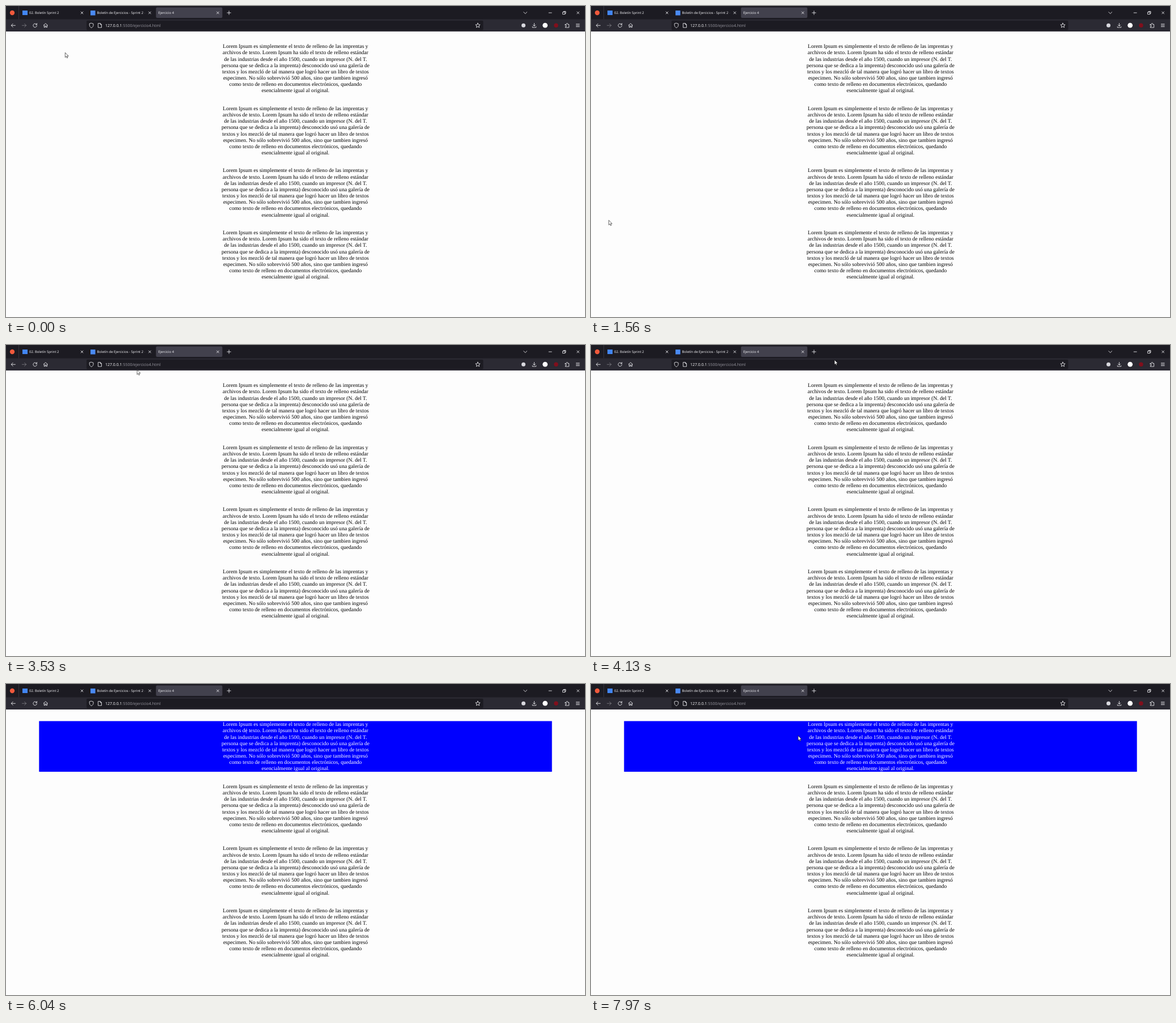
Animation of 1021x549 px, one loop 8 s. Source, as an HTML page:

```html
<!DOCTYPE html>
<html lang="es">
<head>
<meta charset="utf-8">
<title>Ejercicio 4</title>
<style>
  html, body { margin: 0; width: 100%; height: 100%; overflow: hidden; background: #fdfdfd; }
  svg { display: block; width: 1021px; height: 549px; }
  text { text-rendering: geometricPrecision; }
  .ui { font: 5.95px "Open Sans", "Noto Sans", sans-serif; fill: #fbfbfe; }
  .url { font-size: 7px; }
  .muted { fill: #9a99a2; }
  .icon { fill: none; stroke: #f0f0f4; stroke-width: .85; stroke-linecap: round; stroke-linejoin: round; }
  .page { font: 9.57px "Liberation Serif", "Times New Roman", serif; text-anchor: middle; }

  .hovered { animation: ink 8s step-end infinite; }
  .highlight { animation: reveal 8s step-end infinite; }
  .pointer { animation: travel 8s ease-in-out infinite; }
  .arrow { animation: arrow 8s step-end infinite; }
  .beam { animation: beam 8s step-end infinite; }

  @keyframes ink { 0% { fill: #000; } 70.5%, 100% { fill: #fff; } }
  @keyframes reveal { 0% { opacity: 0; } 70.5%, 100% { opacity: 1; } }
  @keyframes arrow { 0%, 92%, 100% { opacity: 1; } 71.5% { opacity: 0; } }
  @keyframes beam { 0%, 92%, 100% { opacity: 0; } 71.5% { opacity: .5; } }
  @keyframes travel {
    0% { transform: translate(104px, 82px); }
    13.75%, 15.75% { transform: translate(36px, 250px); animation-timing-function: ease-in; }
    19.5% { transform: translate(31px, 377px); animation-timing-function: ease-out; }
    22.5% { transform: translate(31px, 486px); }
    35.9%, 36.6% { transform: translate(29px, 61px); }
    51.6% { transform: translate(429px, 26px); }
    64.25% { transform: translate(431px, 45px); }
    75.5%, 86% { transform: translate(424px, 83px); }
    97%, 100% { transform: translate(365px, 91px); }
  }
</style>
</head>
<body>
<svg viewBox="0 0 1021 549">
  <defs>
    <text id="paragraph" class="page"></text>
    <path id="close" class="icon" d="M-1.9-1.9 1.9 1.9M1.9-1.9-1.9 1.9"/>
  </defs>

  <rect width="1021" height="549" fill="#fdfdfd"/>

  <!-- Tab strip -->
  <rect width="1021" height="24" fill="#1c1b22"/>
  <circle cx="11" cy="12" r="4.2" fill="#f0593c"/>
  <path d="M22.5 0V23.5" stroke="#3b3a43" stroke-width=".8"/>
  <rect x="264.5" y="2.5" width="117" height="18.5" rx="2" fill="#42414d"/>
  <rect x="29" y="8" width="9" height="8" fill="#4285f4"/>
  <rect x="149" y="8" width="8.5" height="8.5" fill="#4a8af4"/>
  <g class="ui">
    <text x="41" y="14.2">02. Boletín Sprint 2</text>
    <text x="160.5" y="14.2">Boletín de Ejercicios - Sprint 2 <tspan fill="#666570">-</tspan></text>
    <text x="268.5" y="14.2">Ejercicio 4</text>
  </g>
  <use href="#close" x="134" y="12"/>
  <use href="#close" x="253.5" y="12"/>
  <use href="#close" x="373.5" y="12"/>
  <path class="icon" d="M390 12h6.4M393.2 8.8v6.4M912.8 10.7l2.9 2.9 2.9-2.9M957.2 12h5"/>
  <path class="icon" d="M982 10.8h3.8v3.8h-3.8zM983.2 10.8v-1.3h3.8v3.8h-1.2"/>
  <use href="#close" x="1008.7" y="12"/>

  <!-- Toolbar -->
  <rect y="23.5" width="1021" height="21.5" fill="#2b2a33"/>
  <rect x="142" y="25.8" width="699.5" height="17" rx="2" fill="#1c1b22"/>
  <path class="icon" d="M16.4 34.3H9.4M12.2 31.3l-3 3 3 3"/>
  <path class="icon" opacity=".4" d="M28.4 34.3h7M32.6 31.3l3 3-3 3"/>
  <path class="icon" d="M53.9 32.4a3.3 3.3 0 1 0 .6 2.4M54.5 30.7v2.3h-2.3"/>
  <path class="icon" d="M66.3 34 69.8 30.8 73.3 34M67.2 33.4v4.2h1.8v-2.4h1.7v2.4h1.8v-4.2"/>
  <path class="icon" d="M150.6 30.3 154 31.4v2.3c0 2.3-1.3 3.7-3.4 4.8-2.1-1.1-3.4-2.5-3.4-4.8v-2.3z"/>
  <path class="icon" d="M162.8 30.6h3.5l2.2 2.2v5.2h-5.7zM166.2 30.6v2.3h2.3"/>
  <text class="ui url" x="175" y="36.8">127.0.0.1<tspan class="muted">:5500/ejercicio4.html</tspan></text>
  <path class="icon" d="M832 30.2l1.2 2.6 2.9.3-2.2 1.9.7 2.9-2.6-1.5-2.6 1.5.7-2.9-2.2-1.9 2.9-.3z"/>
  <circle cx="912.5" cy="34.2" r="3.5" fill="#d8d8de"/>
  <path class="icon" d="M931.5 30.5v5M929.3 33.4l2.2 2.2 2.2-2.2M928.3 36.4v1.5h6.4v-1.5"/>
  <circle cx="950.7" cy="34.2" r="4.4" fill="#fff"/>
  <circle cx="970" cy="34.2" r="3.7" fill="#800f1c"/>
  <path class="icon" d="M986.3 32.5h2v-.8a1.2 1.2 0 0 1 2.4 0v.8h2v5.5h-6.4v-1.6h.8a1.2 1.2 0 0 0 0-2.4h-.8z"/>
  <path class="icon" d="M1005.4 31.9h5.8M1005.4 34.2h5.8M1005.4 36.5h5.8"/>

  <!-- Page -->
  <rect class="highlight" x="58.3" y="65.5" width="904.4" height="89.4" fill="#00f"/>
  <use class="hovered" href="#paragraph"/>
  <use href="#paragraph" y="109.57"/>
  <use href="#paragraph" y="219.14"/>
  <use href="#paragraph" y="328.71"/>

  <g class="pointer">
    <path class="arrow" d="M.3.3V8.7L2.2 6.9 3.5 9.8 4.9 9.2 3.6 6.4H6.2Z" fill="#fff" stroke="#000" stroke-width=".6"/>
    <path class="beam" d="M-1.2-4H1.2M0-4V4M-1.2 4H1.2" fill="none" stroke="#fff" stroke-width=".6"/>
  </g>
</svg>
<script>
  const lines = [
    "Lorem Ipsum es simplemente el texto de relleno de las imprentas y",
    "archivos de texto. Lorem Ipsum ha sido el texto de relleno estándar",
    "de las industrias desde el año 1500, cuando un impresor (N. del T.",
    "persona que se dedica a la imprenta) desconocido usó una galería de",
    "textos y los mezcló de tal manera que logró hacer un libro de textos",
    "especimen. No sólo sobrevivió 500 años, sino que tambien ingresó",
    "como texto de relleno en documentos electrónicos, quedando",
    "esencialmente igual al original."
  ];
  const lineHeight = 11.17;
  const paragraph = document.getElementById("paragraph");
  lines.forEach((line, i) => {
    const span = document.createElementNS("http://www.w3.org/2000/svg", "tspan");
    span.setAttribute("x", 510.5);
    span.setAttribute("y", 74.3 + i * lineHeight);
    span.textContent = line;
    paragraph.append(span);
  });
</script>
</body>
</html>
```
